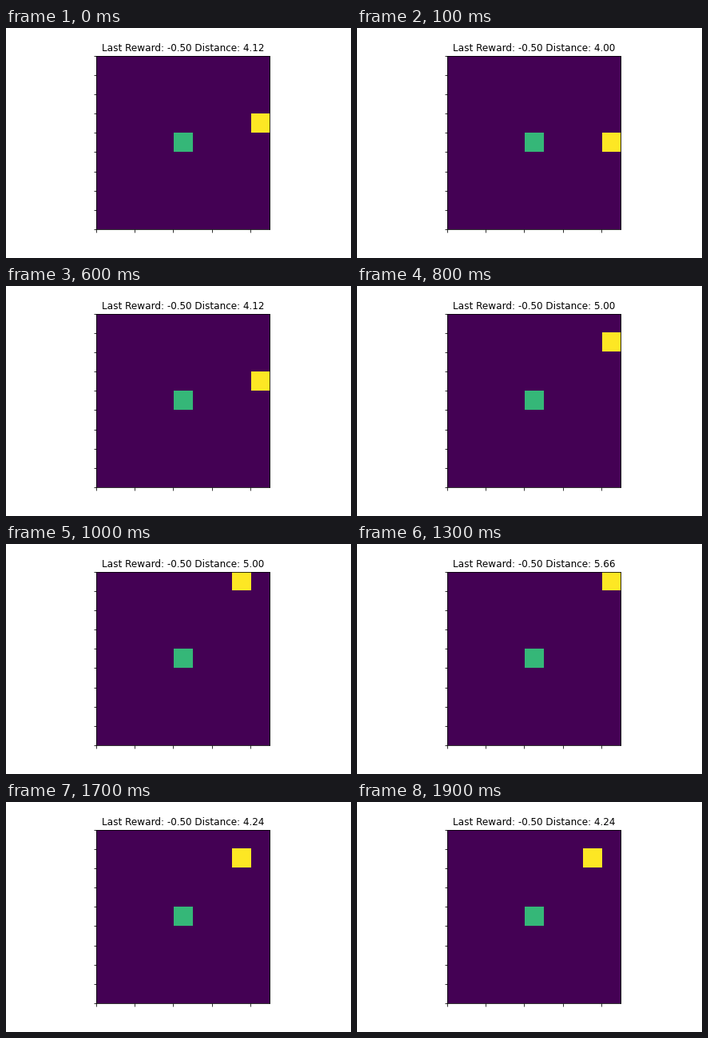
Write a matplotlib script that moves like this. It is 432 by 288 pixels and loops after 2 s.

```python
import math

import matplotlib.pyplot as plt
import numpy as np
from matplotlib.animation import FuncAnimation

SIZE = 9
GOAL = (4, 4)
START = (8, 3)
MOVES = "DLURLRUULURLRDUDLUD"
STEP = {"U": (0, -1), "D": (0, 1), "L": (-1, 0), "R": (1, 0)}

plt.rcParams.update({"font.family": "DejaVu Sans", "font.size": 10})


def agent_at(frame):
    x, y = START
    for move in MOVES[:frame]:
        dx, dy = STEP[move]
        x, y = x + dx, y + dy
    return x, y


def board(agent):
    grid = np.zeros((SIZE, SIZE))
    grid[GOAL[1], GOAL[0]] = 2
    grid[agent[1], agent[0]] = 3
    return grid


fig, ax = plt.subplots(figsize=(6, 4), dpi=72, facecolor="white")
fig.subplots_adjust(left=0.125, right=0.9, bottom=0.125, top=0.88)
image = ax.imshow(board(START), cmap="viridis", vmin=0, vmax=3,
                  interpolation="nearest", extent=(0, SIZE, SIZE, 0))
ax.set_xticks(range(0, SIZE, 2))
ax.set_yticks(range(SIZE + 1))
ax.tick_params(labelbottom=False, labelleft=False)
title = ax.set_title("", fontsize=12)


def update(frame):
    agent = agent_at(frame)
    image.set_data(board(agent))
    title.set_text(f"Last Reward: -0.50 Distance: {math.dist(agent, GOAL):.2f}")
    return image, title


anim = FuncAnimation(fig, update, frames=len(MOVES) + 1, interval=100,
                     repeat=True, repeat_delay=0)
plt.show()
```
